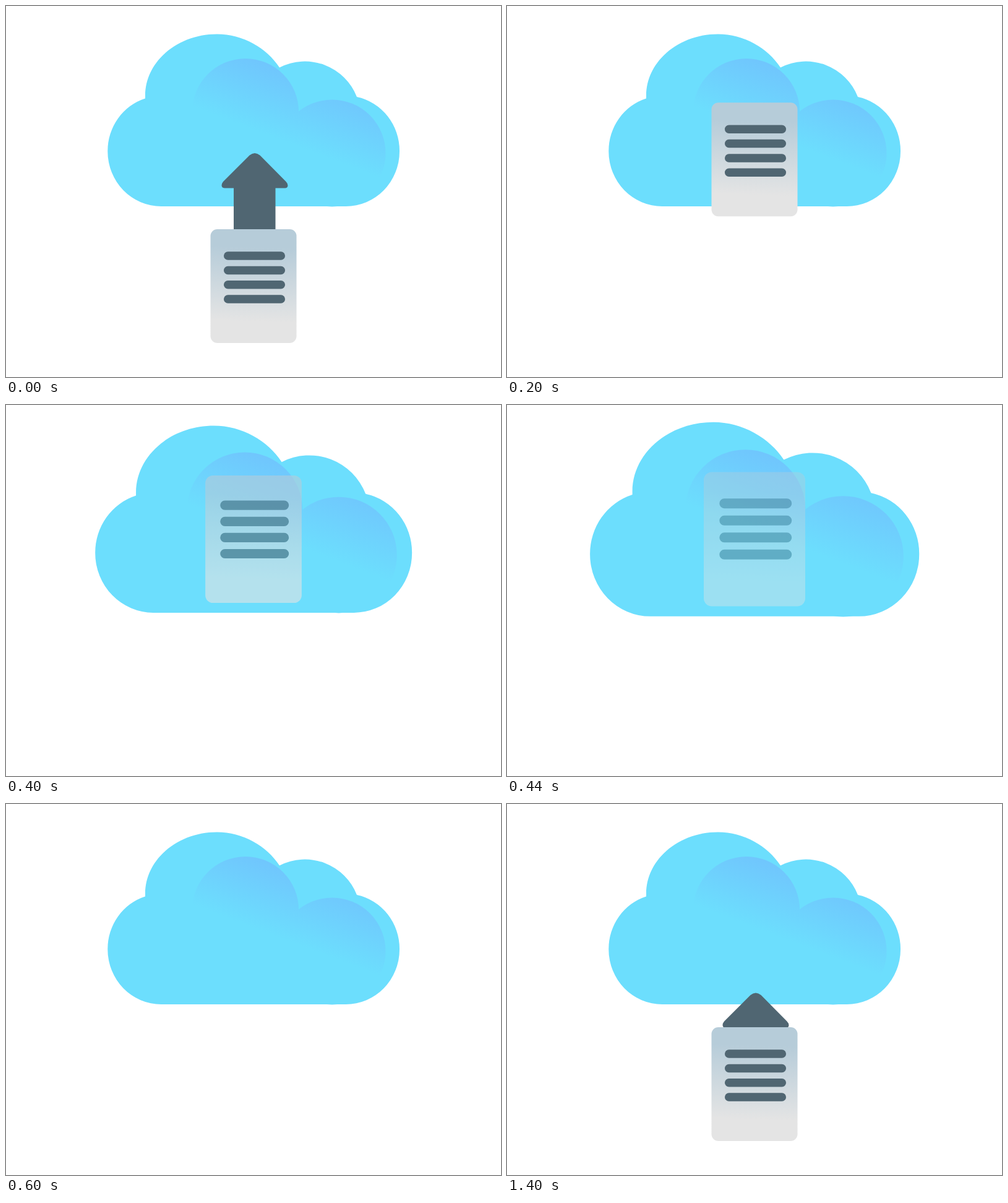
Animation, 800 px wide and 600 px high, one loop 1.44 s. Source, as an HTML page:

```html
<!DOCTYPE html>
<html lang="en">
<head>
<meta charset="utf-8">
<title>Cloud upload</title>
<style>
  html, body { margin: 0; width: 100%; height: 100%; overflow: hidden; background: #fff; }
  svg { display: block; width: 100%; height: 100%; }
</style>
</head>
<body>
<svg viewBox="0 0 800 600">
  <defs>
    <linearGradient id="shade" gradientUnits="userSpaceOnUse" x1="420" y1="93.6" x2="382" y2="193.3">
      <stop offset="0" stop-color="#70c6fd"/>
      <stop offset="1" stop-color="#6cdefd"/>
    </linearGradient>
    <linearGradient id="paper" gradientUnits="userSpaceOnUse" x1="402" y1="390" x2="398" y2="510">
      <stop offset="0" stop-color="#b6ccd9"/>
      <stop offset="1" stop-color="#e4e4e4"/>
    </linearGradient>
  </defs>

  <g id="cloud">
    <path fill="#6cdefd" d="M250.8 324A86.5 89 0 0 1 164.3 235A86.5 89 0 0 1 225 149.5V145
      C225 90 277 45.5 341 45.5C382.9 45.5 421.5 68 442 99.5A90 90 0 0 1 567 147
      A86.5 89 0 0 1 636 235A86.5 89 0 0 1 549.3 324Z"/>
    <g fill="url(#shade)">
      <circle cx="387" cy="171" r="86"/>
      <circle cx="527" cy="238" r="86.5"/>
    </g>
  </g>

  <path id="arrow" fill="#506672" d="M368 294.5H353Q348.5 294 348.5 290Q348.5 287 351 284L393.5 241.5
    Q402 234.5 410.5 241.5L452.5 284Q455.5 287 455.5 290.5Q455 294.5 451 294.5H435.5V361H368Z"/>

  <g id="doc">
    <rect x="330.5" y="361" width="139" height="184" rx="11" fill="url(#paper)"/>
    <path stroke="#506672" stroke-width="13.5" stroke-linecap="round"
      d="M358.7 404H444.3M358.7 427.4H444.3M358.7 450.7H444.3M358.7 474H444.3"/>
  </g>
</svg>
<script>
const LOOP = 1440, STEP = 40;
const [cloud, arrow, doc] = ['cloud', 'arrow', 'doc'].map(id => document.getElementById(id));

// Linear progress from a to b, clamped to 0..1
const ramp = (t, a, b) => Math.min(1, Math.max(0, (t - a) / (b - a)));
const easeBack = (p, c = 1.85) => 1 + (c + 1) * (p - 1) ** 3 + c * (p - 1) ** 2;
const zoom = (x, y, s, dy = 0) => `translate(${x} ${y + dy}) scale(${s}) translate(${-x} ${-y})`;

function draw(t) {
  const pulse = ramp(t, 320, 440) - ramp(t, 440, 600);
  cloud.setAttribute('transform', zoom(400, 184.75, 1 + 0.128 * pulse));

  let scale, alpha, rise = 0;
  if (t < 1120) {
    const leave = ramp(t, 320, 520);
    scale = 1 + 0.3 * leave;
    alpha = 1 - leave;
    rise = -184 * ramp(t, 0, 120) - 52 * ramp(t, 120, 320);
  } else {
    scale = 0.734 + 0.266 * easeBack(ramp(t, 1120, 1360));
    alpha = ramp(t, 1120, 1173);
  }
  doc.setAttribute('transform', zoom(400, 453, scale, rise));
  doc.setAttribute('opacity', alpha);

  const shown = t < 120 || t >= 1360;
  const drop = t < 120 ? 0 : 134.8 * (1 - ramp(t, 1360, LOOP));
  arrow.setAttribute('transform', `translate(0 ${drop})`);
  arrow.setAttribute('visibility', shown ? 'visible' : 'hidden');
}

const start = performance.now();
function tick() {
  const t = (performance.now() - start) % LOOP;
  draw(Math.floor(t / STEP) * STEP);
  requestAnimationFrame(tick);
}
tick();
</script>
</body>
</html>
```
